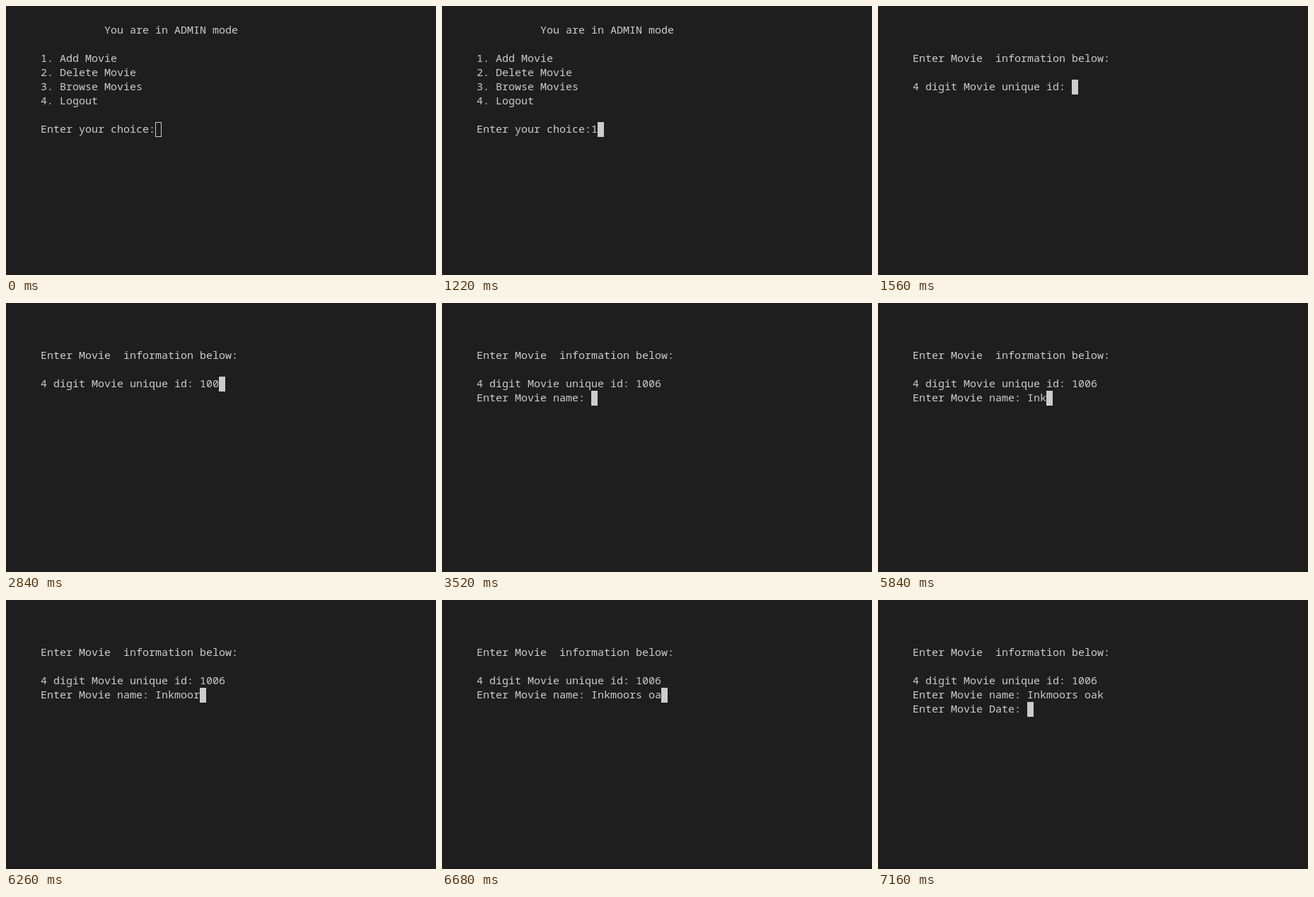
An HTML page with a canvas for the animation above (8 s loop, 608x380 px).

```html
<!DOCTYPE html>
<html lang="en">
<head>
<meta charset="utf-8">
<title>Movie admin terminal</title>
<style>
  html, body { margin: 0; width: 608px; height: 380px; overflow: hidden; background: #1e1e1e; }
  canvas { display: block; }
</style>
</head>
<body>
<canvas id="stage" width="608" height="380"></canvas>
<script>
const ctx = document.getElementById('stage').getContext('2d');
const LOOP = 8000, LEFT = 49, TOP = 24, CELL = 9, LINE = 20;
const BACK = '#1e1e1e', INK = '#cccccc';

const MENU = [
  ' '.repeat(10) + 'You are in ADMIN mode', '',
  '1. Add Movie', '2. Delete Movie', '3. Browse Movies', '4. Logout', ''
];
const FORM = ['', '', 'Enter Movie  information below:', ''];
const CHOICE = 'Enter your choice:';
const ID = '4 digit Movie unique id: ';
const NAME = 'Enter Movie name: ';
const DATE = 'Enter Movie Date: ';

// Each entry is the moment a key lands
const ID_KEYS = [2400, 2760, 2840, 3320];
const NAME_KEYS = [5580, 5720, 5800, 5880, 5960, 6040, 6260, 6340, 6400, 6600, 6680, 6840];

const typed = (text, keys, t) => text.slice(0, keys.filter(k => k <= t).length);

function linesAt(t) {
  if (t < 1560) return [...MENU, CHOICE + typed('1', [1220], t)];
  const lines = [...FORM, ID + typed('1006', ID_KEYS, t)];
  if (t >= 3500) lines.push(NAME + typed('Inkmoors oak', NAME_KEYS, t));
  if (t >= 7160) lines.push(DATE);
  return lines;
}

function drawCursor(col, row, hollow) {
  const x = LEFT + col * CELL, y = TOP + row * LINE;
  ctx.fillRect(x, y, CELL, LINE + 1);
  if (hollow) {
    ctx.fillStyle = BACK;
    ctx.fillRect(x + 1, y + 1, CELL - 2, LINE - 1);
  }
}

function draw(t) {
  ctx.fillStyle = BACK;
  ctx.fillRect(0, 0, 608, 380);
  ctx.fillStyle = INK;
  ctx.font = '15px "Noto Sans Mono", monospace';
  ctx.textBaseline = 'alphabetic';

  const lines = linesAt(t);
  lines.forEach((line, row) => {
    [...line].forEach((ch, col) => ctx.fillText(ch, LEFT + col * CELL, TOP + 15 + row * LINE));
  });

  // The cursor trails the new prompt by one repaint
  const row = lines.length - (t >= 3500 && t < 3520 ? 2 : 1);
  drawCursor(lines[row].length, row, t < 80);
}

const start = performance.now();
function tick() {
  draw((performance.now() - start) % LOOP);
  requestAnimationFrame(tick);
}
tick();
</script>
</body>
</html>
```
